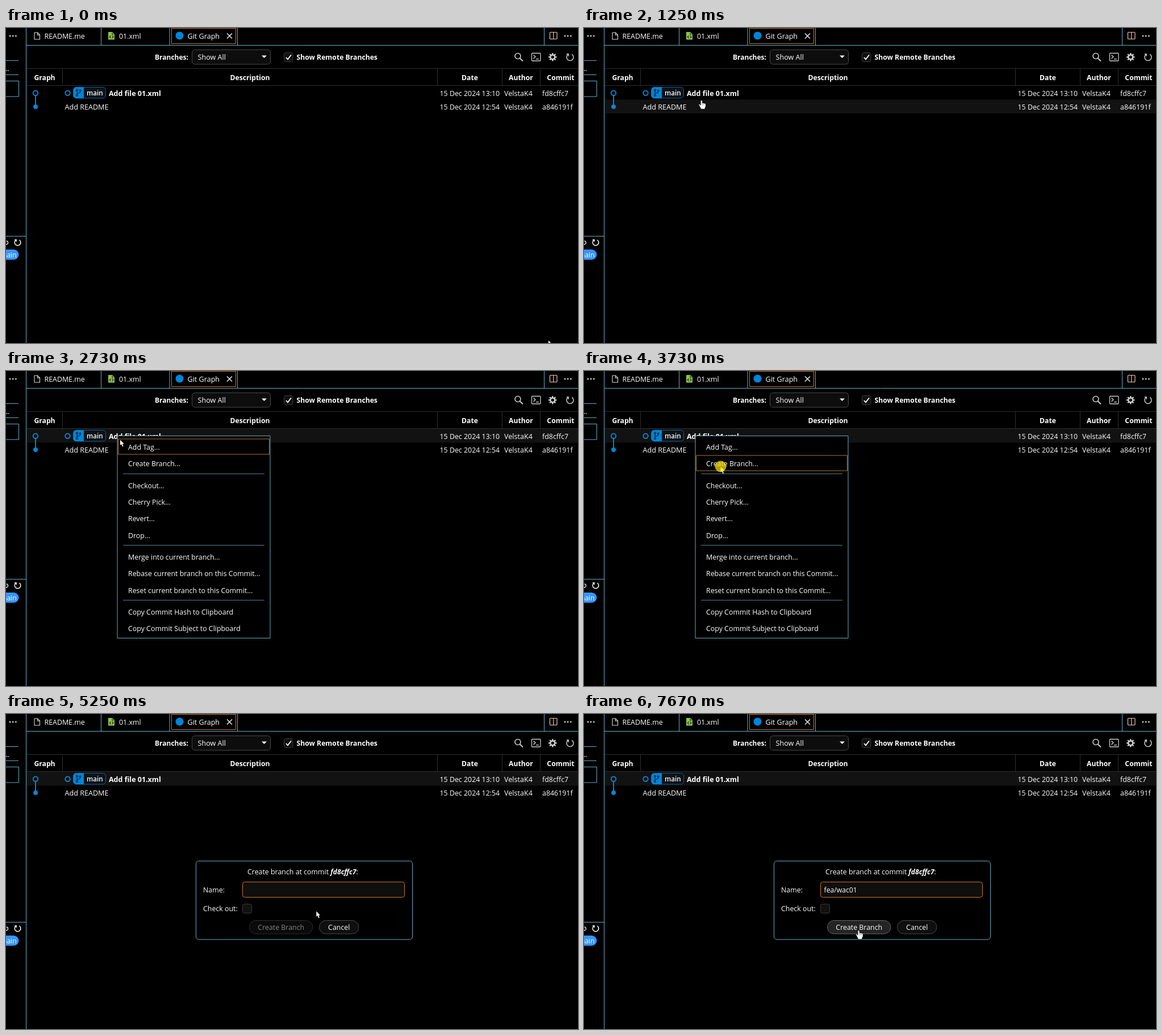
An HTML page with a canvas that plays this animation: 1007 by 556 pixels, repeating every 8 s.

```html
<!DOCTYPE html>
<html lang="en">
<head>
<meta charset="utf-8">
<title>Create a branch</title>
<style>
html, body { margin: 0; width: 100%; height: 100%; overflow: hidden; background: #000; }
canvas { display: block; }
</style>
</head>
<body>
<canvas id="stage" width="1007" height="556"></canvas>
<script>
const ctx = document.getElementById('stage').getContext('2d');
const LOOP = 8000;
const EDGE = '#62adc7', ORANGE = '#cf7420', BLUE = '#0085d9', GREY = '#2e2e2e', WHITE = '#fff';

// Pointer moves: first step, last step, step count, target
const MOVES = [
  [70, 530, 8, 353.5, 297],
  [930, 1390, 8, 197, 116.5],
  [2660, 3070, 7, 240.5, 169],
  [4130, 4410, 5, 573, 351],
  [4690, 5450, 11, 544, 348],
  [6580, 7340, 12, 483.5, 382]
];
const MENU = [
  ['Add Tag...', 134], ['Create Branch...', 163], ['Checkout...', 202], ['Cherry Pick...', 231],
  ['Revert...', 260], ['Drop...', 290], ['Merge into current branch...', 328],
  ['Rebase current branch on this Commit...', 357], ['Reset current branch to this Commit...', 387],
  ['Copy Commit Hash to Clipboard', 425], ['Copy Commit Subject to Clipboard', 454]
];
const COMMITS = [
  [115, '15 Dec 2024 13:10', 'VelstaK4', 'fd8cffc7'],
  [139, '15 Dec 2024 12:54', 'VelstaK4', 'a846191f']
];

const ease = p => p < .5 ? 4 * p ** 3 : 1 - 4 * (1 - p) ** 3;
const within = (t, a, b) => t >= a && t < b;

function pointerAt(t) {
  let x = 955, y = 551.5;
  for (const [a, b, n, tx, ty] of MOVES) {
    if (t < a) break;
    const step = Math.min(n, Math.floor((t - a) / (b - a) * (n - 1) + .2) + 1);
    const k = ease(step / n);
    x += (tx - x) * k;
    y += (ty - y) * k;
  }
  return { x, y };
}

// Text placed by its vertical middle
function text(s, x, mid, { size = 12.4, style = '', color = WHITE, align = 'left' } = {}) {
  ctx.font = `${style} ${size}px "Open Sans", "Noto Sans", sans-serif`;
  ctx.fillStyle = color;
  ctx.textAlign = align;
  ctx.fillText(s, x, mid + 4.5);
  return ctx.measureText(s).width;
}
const bold = (s, x, mid, o = {}) => text(s, x, mid, { size: 12.2, style: 'bold', ...o });

function line(color, width, ...pts) {
  ctx.beginPath();
  for (let i = 0; i < pts.length; i += 2) ctx.lineTo(pts[i], pts[i + 1]);
  ctx.strokeStyle = color;
  ctx.lineWidth = width;
  ctx.stroke();
}

function shape(color, ...pts) {
  ctx.beginPath();
  for (let i = 0; i < pts.length; i += 2) ctx.lineTo(pts[i], pts[i + 1]);
  ctx.closePath();
  ctx.fillStyle = color;
  ctx.fill();
}

function box(x, y, w, h, r, fill, stroke, width = 1) {
  ctx.beginPath();
  ctx.roundRect(x, y, w, h, r);
  if (fill) { ctx.fillStyle = fill; ctx.fill(); }
  if (stroke) { ctx.strokeStyle = stroke; ctx.lineWidth = width; ctx.stroke(); }
}

function disc(x, y, r, color) {
  ctx.beginPath();
  ctx.arc(x, y, r, 0, 7);
  ctx.fillStyle = color;
  ctx.fill();
}

function ring(x, y, r, color, width, a = 0, b = Math.PI * 2) {
  ctx.beginPath();
  ctx.arc(x, y, r, a, b);
  ctx.strokeStyle = color;
  ctx.lineWidth = width;
  ctx.stroke();
}

function dots(x, y) {
  for (let i = 0; i < 3; i++) disc(x + i * 5.2, y, 1.2, WHITE);
}

function refresh(x, y, r, color) {
  ring(x, y, r, color, 1.5, -1, 4.1);
  line(color, 1.4, x - r, y - r + .5, x - r * .45, y - r + .5, x - r * .45, y - r * .25);
}

function gear(x, y) {
  ring(x, y, 3.9, '#ccc', 2.6);
  for (let i = 0; i < 8; i++) {
    const c = Math.cos(i * Math.PI / 4), s = Math.sin(i * Math.PI / 4);
    line('#ccc', 2.4, x + c * 4.5, y + s * 4.5, x + c * 7.2, y + s * 7.2);
  }
}

function sidebar() {
  dots(7, 14);
  line(EDGE, 1, 0, 57.5, 22, 57.5);
  line(EDGE, 1, 0, 82.5, 22, 82.5);
  disc(.5, 75, .9, '#ddd');
  disc(3.7, 75, .9, '#ddd');
  box(-9.5, 93.5, 32, 27.5, 0, null, EDGE);
  line(EDGE, 1, 0, 367.5, 36, 367.5);
  ring(.5, 379, 3, '#ddd', 1.4, -1.5, 1.8);
  refresh(20.5, 378.5, 5.3, WHITE);
  box(-20, 391, 42.5, 18, 9, '#3794ff');
  text('main', 18.5, 400, { size: 12, align: 'right' });
}

function tabs() {
  line(EDGE, 1, 36, 30.5, 1007, 30.5);
  for (const x of [167.5, 288, 407.5, 947.5]) line(EDGE, 1, x, 0, x, 30);
  line('#ddd', 1.1, 50, 8, 55.5, 8, 59.5, 12, 59.5, 20, 50, 20, 50, 8);
  line('#ddd', 1.1, 55.3, 8, 55.3, 12.2, 59.5, 12.2);
  text('README.me', 67.5, 14);
  shape('#8bc34a', 180, 7, 187, 7, 191, 11, 191, 20.5, 180, 20.5);
  shape('#33480f', 186.3, 8, 190, 11.7, 186.3, 11.7);
  line('#1c2a08', 1.2, 184.5, 13.5, 182.3, 15.8, 184.5, 18);
  line('#1c2a08', 1.2, 186.8, 13.5, 189, 15.8, 186.8, 18);
  text('01.xml', 199, 14);
  box(291.5, .5, 113, 27, 0, null, ORANGE);
  disc(305.5, 13.5, 7, BLUE);
  text('Git Graph', 319.5, 14, { size: 12.6 });
  line(WHITE, 1.3, 389, 9.5, 398, 18.5);
  line(WHITE, 1.3, 398, 9.5, 389, 18.5);
  box(957.5, 7.5, 12.5, 12, 1, null, '#f3c3b2', 1.2);
  line('#f3c3b2', 1.2, 963.8, 7.5, 963.8, 19.5);
  dots(984, 14);
}

function toolbar() {
  bold('Branches:', 262, 51.5, { size: 12 });
  box(327.5, 38.5, 138, 25.5, 5, '#0d0d0d', '#4a4a4a');
  text('Show All', 337.5, 51.5, { size: 12.6 });
  shape(WHITE, 450, 48.5, 459, 48.5, 454.5, 53);
  box(489.5, 43.5, 15.5, 16, 3, '#111', '#3c3c3c');
  line(WHITE, 1.8, 493, 52, 496, 55.3, 502, 47.5);
  bold('Show Remote Branches', 511.5, 51.5);
  ring(901, 49.5, 5, '#ccc', 1.6);
  line('#ccc', 2, 904.6, 53.2, 910, 58.5);
  box(925.5, 44.5, 15.5, 13.5, 1, null, '#ccc', 1.3);
  line('#ccc', 1.4, 928.5, 47.5, 932, 50.8, 928.5, 54);
  line('#ccc', 1.4, 933, 54.8, 938, 54.8);
  gear(962.3, 51.3);
  refresh(993, 51.5, 6, '#ccc');
}

function table(row) {
  if (row >= 0) {
    ctx.fillStyle = '#121212';
    ctx.fillRect(36, 102 + row * 24.3, 971, 24.4);
  }
  line(GREY, 1, 36, 71.5, 1007, 71.5);
  line(GREY, 1, 36, 101.5, 1007, 101.5);
  for (const x of [99.5, 759.5, 873.5, 940.5]) line(GREY, 1, x, 71, x, 102);
  const heads = [['Graph', 68], ['Description', 429.5], ['Date', 816.5], ['Author', 906.5], ['Commit', 976.5]];
  for (const [s, x] of heads) bold(s, x, 87, { align: 'center' });

  line(BLUE, 2, 52, 119, 52, 139);
  ring(52, 114.8, 4.2, BLUE, 2);
  disc(52, 139, 4, BLUE);
  ring(108.5, 114.8, 4.2, BLUE, 2);
  box(118.5, 104.5, 57, 19.5, 5, '#0b1218', '#0a629c');
  box(118.5, 104.5, 18.5, 19.5, [5, 0, 0, 5], BLUE);
  line('#021b2c', 1.2, 125, 110, 125, 118);
  line('#021b2c', 1.2, 130.5, 111, 130.5, 113.5, 125, 116);
  for (const [x, y] of [[125, 109.5], [130.5, 110.5], [125, 119]]) ring(x, y, 1.5, '#021b2c', 1.1);
  text('main', 142, 114, { size: 11.7, style: '600' });
  bold('Add file 01.xml', 181, 115, { size: 12.5 });
  text('Add README', 103.5, 139.2, { size: 12.6 });
  for (const [y, date, author, hash] of COMMITS) {
    text(date, 763.5, y);
    text(author, 877, y, { size: 12.6 });
    text(hash, 944, y);
  }
}

function menu(hover) {
  box(196, 114.5, 269, 357, 0, '#000', EDGE);
  for (const y of [181.5, 307.5, 404.5]) line('#4d7f92', 1, 206, y, 455, y);
  MENU.forEach(([s, y], i) => {
    if (i === hover) box(197.5, y - 14, 266, 27, 0, null, '#b0762c');
    text(s, 215, y);
  });
}

function button(s, x, w, { color = WHITE, edge = '#4a4a4a', fill = '#0f0f0f' } = {}) {
  box(x, 364.5, w, 23.5, 11.75, fill, edge);
  text(s, x + w / 2, 376.5, { color, align: 'center' });
}

function dialog(t, hover) {
  const typed = t >= 6120;
  box(334.5, 259.5, 381, 138.5, 5, '#000', EDGE);
  let x = 425;
  x += text('Create branch at commit ', x, 278.5);
  x += text('fd8cffc7', x, 278.5, { style: 'italic bold', size: 12.1 });
  text(':', x, 278.5);
  text('Name:', 347, 310.5);
  box(416.5, 296.5, 285, 27, 4, '#0f0f0f', ORANGE);
  if (typed) text('fea/wac01', 422.5, 310.5, { size: 12.2 });
  const caret = within(t, 4690, 4950) || within(t, 5450, 5980) ||
    within(t, 6120, 6645) || within(t, 7170, 7670);
  if (caret) {
    ctx.fillStyle = WHITE;
    ctx.fillRect(typed ? 481 : 423, 301, 1, 18);
  }
  text('Check out:', 347, 343.5);
  box(416.5, 335.5, 16, 16, 3, '#111', '#3c3c3c');
  const off = { color: '#858585', edge: GREY, fill: '#0a0a0a' };
  const on = { edge: '#686868', fill: hover ? '#242424' : '#131313' };
  button('Create Branch', 428.5, 111.5, typed ? on : off);
  button('Cancel', 551.5, 69.5);
}

function arrow(x, y) {
  shape(WHITE, x, y, x, y + 9.6, x + 2.2, y + 7.8, x + 4, y + 12, x + 5.6, y + 11.3, x + 3.9, y + 7.3, x + 6.8, y + 7.1);
}

function hand(x, y) {
  ctx.save();
  ctx.translate(x, y);
  box(-1.4, 0, 2.9, 10, 1.4, WHITE, '#000', .6);
  for (let i = 0; i < 3; i++) box(1.2 + i * 1.9, 4.6 + i * .5, 2.2, 6, 1.1, WHITE);
  shape(WHITE, -4.6, 7.2, -3.6, 6.6, -1.4, 9, 0, 7, 7, 7, 7, 10.5, 5.4, 15, -.6, 15, -2, 12);
  line('#777', .5, 1.5, 5, 1.5, 9);
  line('#777', .5, 3.4, 5.6, 3.4, 9);
  line('#777', .5, 5.2, 6, 5.2, 9);
  ctx.restore();
}

function draw(t) {
  const { x, y } = pointerAt(t);
  const rowAtPointer = within(y, 102, 150.5) ? (y < 126.5 ? 0 : 1) : -1;
  const onRow = t < 1870 && rowAtPointer >= 0;
  const onButton = t >= 6580 && x < 540 && y > 364;

  ctx.fillStyle = '#000';
  ctx.fillRect(0, 0, 1007, 556);
  table(t < 1870 ? rowAtPointer : 0);
  sidebar();
  line(EDGE, 1, 35.5, 0, 35.5, 556);
  tabs();
  toolbar();
  if (within(t, 2000, 3870)) menu(y > 148.5 ? 1 : y > 120 ? 0 : -1);
  if (t >= 3870) dialog(t, onButton);

  if (onRow || onButton) hand(x, y);
  else arrow(x, y);
  if (within(t, 1870, 2000)) disc(197, 116, 10, 'rgba(235, 20, 40, .65)');
  if (within(t, 3730, 3870)) disc(240.5, 168.5, 10, 'rgba(255, 230, 0, .7)');
}

let start;
function tick(now) {
  start ??= now;
  draw((now - start) % LOOP);
  requestAnimationFrame(tick);
}
draw(0);
requestAnimationFrame(tick);
</script>
</body>
</html>
```
